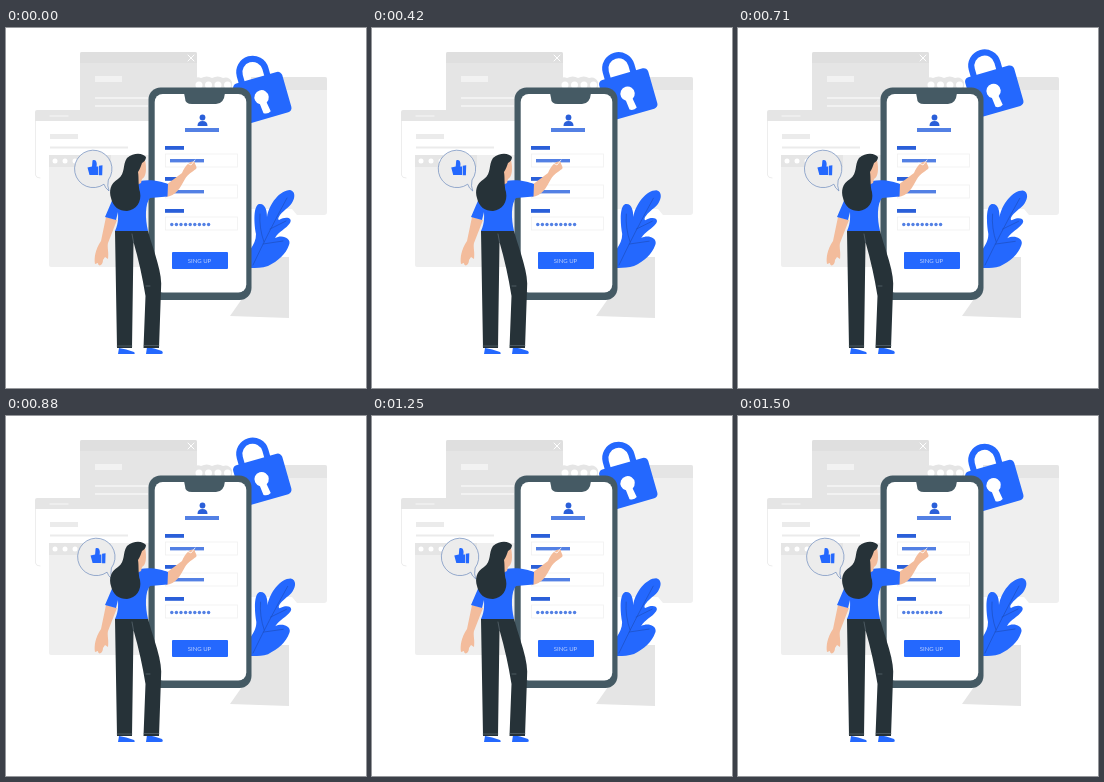
An HTML page for the animation above (1540 ms loop, 360 px wide and 360 px high).

```html
<!DOCTYPE html>
<html lang="en">
<meta charset="utf-8">
<title>Sign-up illustration</title>
<style>
  html, body { margin: 0; width: 100%; height: 100%; overflow: hidden; background: #fff; }
  svg { display: block; width: 100vw; height: 100vh; }
  .blue { fill: #2468fe; }
  .skin { fill: #f3bc9c; }
  .dark { fill: #263238; }
  .mid { fill: #e5e5e5; }
  .pale { fill: #efefef; }
  .white { fill: #fff; }
  .entry { fill: #5380e4; }
  .label { fill: #2a5fd9; }
  .box { fill: #fff; stroke: #f0f0f0; stroke-width: .8; }
  .line { fill: none; stroke-linecap: round; }
</style>
<svg viewBox="0 0 360 360">
  <g id="windows">
    <path class="mid" d="M76 24H189Q191 24 191 26V82H74V26Q74 24 76 24Z"/>
    <path fill="#dfdfdf" d="M76 24H189Q191 24 191 26V35H74V26Q74 24 76 24Z"/>
    <path class="line" stroke="#fff" d="M182 27l6 6m0-6l-6 6"/>
    <path fill="#f2f2f2" d="M89 48h27v6H89zM89 69h53v2H89zM89 77h53v2H89z"/>
    <path class="mid" d="M187 62V52Q190 48 195 50Q201 47 206 50Q212 47 217 50Q223 48 226 54V62Z"/>
    <path class="line" stroke="#fff" stroke-width="7" stroke-dasharray="0 9.500" d="M193 57H225"/>
    <path class="pale" d="M245 49H319Q321 49 321 51V184Q321 187 318 187H291L286 181H245Z"/>
    <path class="mid" d="M245 49H319Q321 49 321 51V62H245Z"/>
    <path class="mid" d="M240 229H283V290L224 288L238 268Z"/>
    <path class="pale" d="M43 127H146V239H45Q43 239 43 237Z"/>
    <path class="line" stroke="#ededed" d="M29.500 93V147Q30 150 34 150"/>
    <path class="mid" d="M31 82H146V93H29V84Q29 82 31 82ZM43 127h62v12H43z"/>
    <path fill="#ebebeb" d="M44 106h28v5H44zM44 118.500h78v2H44z"/>
    <path class="line" stroke="#f7f7f7" d="M44 88H62"/>
    <g class="white"><circle cx="49" cy="133" r="2.500"/><circle cx="59" cy="133" r="2.500"/><circle cx="69" cy="133" r="2.500"/></g>
  </g>

  <g id="lock">
    <g transform="translate(256 69) rotate(-16)">
      <path class="line" stroke="#2468fe" stroke-width="6.200" d="M-15.500 -14V-26.500a13.300 13.300 0 0 1 26.600 0V-14"/>
      <rect class="blue" x="-25.500" y="-20" width="51" height="42" rx="4.500"/>
      <path class="white" d="M-4 6.500A7.200 7.200 0 1 1 3 6.500L4.500 16Q1 18.500 -3 16Z"/>
    </g>
  </g>

  <g id="leaf">
    <path class="blue" d="M244 240V222C248 216 250 212 250 206C248 196 247 178 253 176C260 175 261 184 261 189C263 176 274 162 284 162C292 164 288 176 280 181C273 187 271 191 273 192C280 188 287 190 284 195C280 201 273 203 269 210C276 206 286 210 283 217C280 226 272 233 262 238C256 240 250 240 244 240Z"/>
    <path class="line" stroke="#1d4fc0" stroke-width=".7" d="M247 237Q262 205 281 170M258 214Q253 200 254 186M257 216L277 213M264 201L280 193"/>
  </g>

  <g id="phone">
    <rect fill="#455a64" x="142.500" y="59.500" width="103" height="212.500" rx="12"/>
    <rect class="white" x="148.700" y="66" width="91.600" height="198.500" rx="8"/>
    <path fill="#455a64" d="M178 65H219Q218 76 210 76H186Q179 76 179 70Z"/>
    <circle class="label" cx="196.500" cy="89.500" r="2.900"/>
    <path class="label" d="M191.500 98Q191.500 93 196.500 93T201.500 98Z"/>
    <rect class="entry" x="179" y="100" width="34" height="4"/>
    <g id="fields"></g>
    <rect class="blue" x="166" y="224" width="56" height="17" rx="1"/>
    <text x="193.500" y="234.500" font-family="Lato, sans-serif" font-size="6" fill="#bdd0fb" text-anchor="middle">SING UP</text>
  </g>

  <g id="bubble">
    <path fill="#ececec" stroke="#6d8bbd" stroke-width=".7" d="M98 156.200A18.700 18.700 0 1 1 102.300 152Q101 158 103 163Q99 160 98 156.200Z"/>
    <path class="blue" d="M81.500 139.500L86 138.500L86.500 132.500C90 130.500 91.500 135 90.500 138.500H92.300V147H83.500ZM93 137.700L96.500 137.200L96.200 147.300H93Z"/>
  </g>

  <g id="woman">
    <path class="blue" d="M113 320Q120 321 128 324Q130 326 127 326H112ZM141 319Q148 320 156 323Q158 326 155 326H140Z"/>
    <path class="dark" d="M109 203H142C148 225 157 245 155 262L153 320H137.500L139.500 268Q135 240 127.500 214L126 320H111Z"/>
    <path class="line" stroke="#73808a" stroke-width=".5" d="M111 318H126M138 317.500H153M127.500 214L126 206M140 258H144"/>
    <path class="skin" d="M100 189L95 213C89 222 88 230 89 236L92 235C92 239 97 238 97 232L99 229L102 231C103 224 101 219 102 215L111 192Z"/>
    <path class="skin" d="M160 157L176 145C180 136 185 132 189 134C188 136 192 139 190 141C186 144 182 146 179 151C174 160 170 168 160 169Z"/>
    <path class="line" stroke="#fff" stroke-width=".8" d="M181 135L185 137L189 132"/>
    <path class="blue" d="M134 153C146 151 156 154 162 156L161.500 168.500L144 170C139 176 139 190 142 203H109C113 195 112 187 112 184L110 192L99 189L108 168Z"/>
    <path class="skin" d="M131 138L139 132C141 141 140 149 136 151L135 155L131 157Z"/>
    <path class="dark" d="M140 129C137 125 128 124 121 130C116 137 120 145 112 151C104 156 103 163 105 170C107 179 113 183 121 183C130 182 136 174 134 164C132 158 133 150 132 144C134 141 135 138 136 135C138 134 140 132 140 129Z"/>
  </g>
</svg>
<script>
  const LOOP = 1540, STEP = LOOP / 37;
  const part = id => document.getElementById(id);
  const rect = (kind, x, y, w, h) =>
    `<rect class="${kind}" x="${x}" y="${y}" width="${w}" height="${h}"/>`;

  part("fields").innerHTML = [118, 149, 181].map((y, row) =>
    rect("label", 159, y, 19, 3.8) + rect("box", 159.5, y + 8, 72, 13) +
    (row < 2 ? rect("entry", 164, y + 13, 34, 3.4)
      : Array.from({ length: 9 }, (_, i) =>
          `<circle class="entry" cx="${165.8 + i * 4.6}" cy="196.5" r="1.7"/>`).join(""))
  ).join("");

  // Time and horizontal offset of the bubble.
  const sway = [[0, 0], [210, .7], [500, -3], [640, -3], [920, 3.5], [1250, .8], [LOOP, 0]];

  function swayAt(t) {
    const i = sway.findIndex(key => key[0] > t);
    const [t0, x0] = sway[i - 1], [t1, x1] = sway[i];
    return x0 + (x1 - x0) * (1 - Math.cos(Math.PI * (t - t0) / (t1 - t0))) / 2;
  }

  function draw(now) {
    const t = Math.floor(now % LOOP / STEP) * STEP;
    const lift = (1 - Math.cos(2 * Math.PI * t / LOOP)) / 2;
    part("lock").setAttribute("transform", `translate(0 ${-6.5 * lift})`);
    part("leaf").setAttribute("transform", `rotate(${.6 * lift} 246 240)`);
    part("bubble").setAttribute("transform", `translate(${swayAt(t)} 0)`);
    requestAnimationFrame(() => draw(performance.now()));
  }
  draw(performance.now());
</script>
</html>
```
